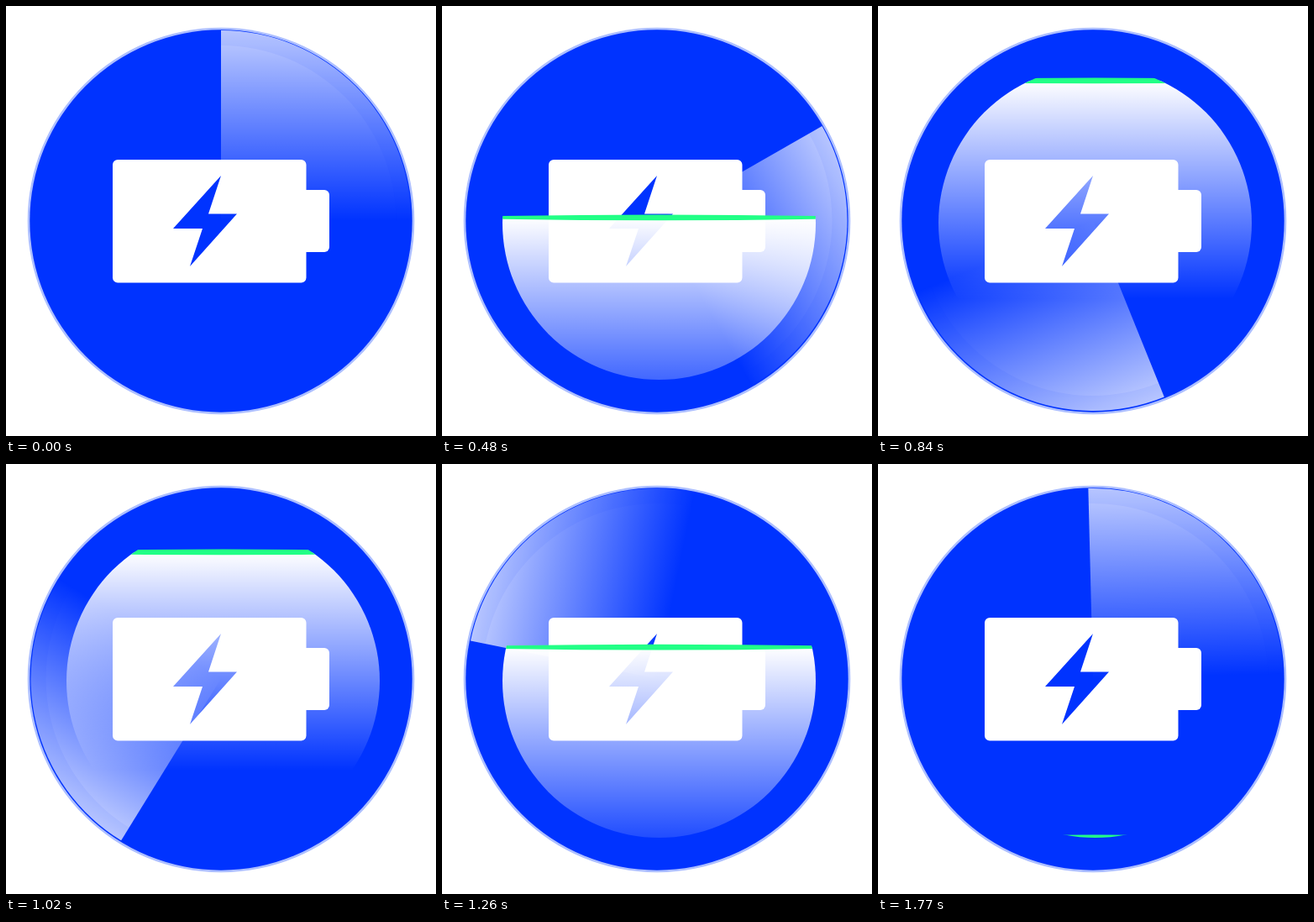
Recreate the animation shown at these times as an HTML page with a canvas. Size 512 by 512 pixels, loop 1800 ms.

```html
<!DOCTYPE html>
<html lang="en">
<head>
<meta charset="utf-8">
<title>Battery charging</title>
<style>
  html, body { margin: 0; width: 100%; height: 100%; overflow: hidden; background: #fff; }
  canvas { display: block; width: 100vw; height: 100vh; }
</style>
</head>
<body>
<canvas id="stage" width="512" height="512"></canvas>
<script>
const ctx = document.getElementById('stage').getContext('2d');
const LOOP = 1800, STEPS = 50, STEP = LOOP / STEPS, TICK = 30;
const BLUE = '#0033ff', RIM = '#adbfff', GREEN = '#21ff86';
const TANK = { x: 258.5, y: 258.5, r: 186.5 };
const FADE = 260;

const white = a => `rgba(255,255,255,${a})`;
const smooth = p => p * p * (3 - 2 * p);

function disc(x, y, r, fill) {
  ctx.beginPath();
  ctx.arc(x, y, r, 0, Math.PI * 2);
  ctx.fillStyle = fill;
  ctx.fill();
}

function fade(y0, y1, alpha) {
  const g = ctx.createLinearGradient(0, y0, 0, y1);
  g.addColorStop(0, white(alpha));
  g.addColorStop(1, white(0));
  return g;
}

// Quarter sector whose leading edge points up before rotation.
function drawSweep(degrees) {
  const r = 226.5;
  ctx.save();
  ctx.translate(256, 255.5);
  ctx.rotate(degrees * Math.PI / 180);
  ctx.beginPath();
  ctx.moveTo(0, 0);
  ctx.arc(0, 0, r, -Math.PI / 2, 0);
  ctx.closePath();
  ctx.fillStyle = fade(-r, 0, 0.76);
  ctx.fill();
  ctx.beginPath();
  ctx.arc(0, 0, r, -Math.PI / 2, 0);
  ctx.arc(0, 0, 208.5, 0, -Math.PI / 2, true);
  ctx.closePath();
  ctx.fillStyle = 'rgba(0,51,255,0.06)';
  ctx.fill();
  ctx.restore();
}

const battery = new Path2D();
battery.roundRect(127, 183, 230.5, 146.5, 6);
const cap = new Path2D();
cap.roundRect(357, 219, 28, 74, [0, 6, 6, 0]);
// Bolt is cut out of the body.
battery.addPath(new Path2D('M256 202L199 265H234L219 310L275 247.5H241Z'));

function drawBattery() {
  ctx.fillStyle = '#fff';
  ctx.fill(battery, 'evenodd');
  ctx.fill(cap);
}

function drawLiquid(level) {
  const left = TANK.x - TANK.r, right = TANK.x + TANK.r;
  const end = 1.9, bulge = 4.9;
  ctx.save();
  ctx.beginPath();
  ctx.arc(TANK.x, TANK.y, TANK.r, 0, Math.PI * 2);
  ctx.clip();
  ctx.fillStyle = fade(level, level + FADE, 1);
  ctx.fillRect(left, level, TANK.r * 2, FADE);
  ctx.beginPath();
  ctx.moveTo(left, level - end);
  ctx.quadraticCurveTo(TANK.x, level - bulge, right, level - end);
  ctx.lineTo(right, level + end);
  ctx.quadraticCurveTo(TANK.x, level + bulge, left, level + end);
  ctx.closePath();
  ctx.fillStyle = GREEN;
  ctx.fill();
  ctx.restore();
}

function draw(ms) {
  const shown = Math.floor((ms % LOOP) / TICK) * TICK;
  const k = Math.floor(shown / STEP);
  const d = k - STEPS / 2;
  const level = 56.2 + (d < 0 ? -16.3 : 16.2) * d;

  ctx.fillStyle = '#fff';
  ctx.fillRect(0, 0, 512, 512);
  disc(256, 256, 230.3, RIM);
  disc(256, 256, 227.7, BLUE);
  drawSweep(359 * smooth(k / STEPS));
  drawBattery();
  drawLiquid(level);
}

const start = performance.now();
function tick() {
  draw(performance.now() - start);
  requestAnimationFrame(tick);
}
tick();
</script>
</body>
</html>
```
